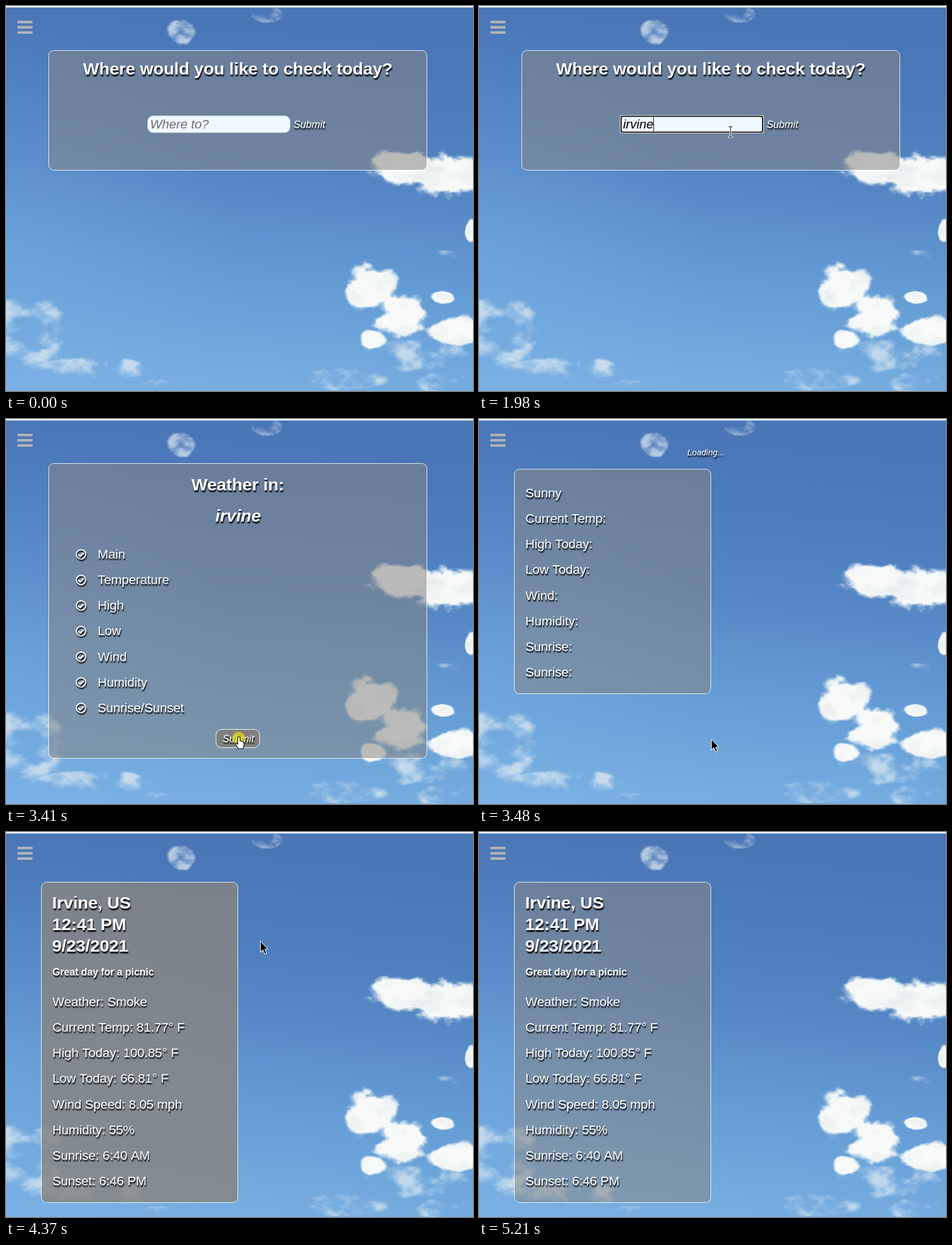
Write an HTML page with a canvas that moves like this. It is 825 px wide and 679 px high and loops after 5740 ms.

```html
<!DOCTYPE html>
<html lang="en">
<head>
<meta charset="utf-8">
<title>Weather check</title>
<style>
  html, body { margin: 0; width: 100%; height: 100%; overflow: hidden; background: #fff; }
  canvas { display: block; }
</style>
</head>
<body>
<canvas id="stage" width="825" height="679"></canvas>
<script>
const W = 825, H = 679, LOOP = 5740, STEP = 70;
const ctx = document.getElementById('stage').getContext('2d');
const FAMILY = '"Liberation Sans", Arial, sans-serif';
const TITLE = 'bold 30.2px', ROW = 45.15;

const clamp = v => Math.max(0, Math.min(1, v));
const mix = (a, b, p) => a + (b - a) * p;
const smooth = p => p * p * (3 - 2 * p);

// ---------- sky ----------
// Soft ellipses [x, y, rx, ry]; noise frays their edges.
const CLOUDS = [
  [695,284,72,34], [788,302,68,48], [645,500,54,50], [695,540,62,46],
  [795,572,58,28], [648,588,28,19], [770,514,24,13], [822,398,12,24]
];
const WISPS = [
  [35,570,70,75], [155,640,130,22], [265,672,45,15], [720,615,110,30],
  [595,658,85,22], [775,664,55,22], [775,445,40,16], [460,14,32,16], [310,45,26,24]
];

function hash(x, y) {
  const v = Math.sin(x * 127.1 + y * 311.7) * 43758.5453;
  return v - Math.floor(v);
}

function noise(x, y) {
  const ix = Math.floor(x), iy = Math.floor(y);
  const px = smooth(x - ix), py = smooth(y - iy);
  return mix(mix(hash(ix, iy), hash(ix + 1, iy), px),
    mix(hash(ix, iy + 1), hash(ix + 1, iy + 1), px), py);
}

// Layered noise, about -1 to 1
function ragged(x, y) {
  let sum = 0;
  for (let octave = 0, gain = 1; octave < 5; octave++, gain *= 0.55) {
    const scale = 2 ** octave;
    sum += (noise(x * scale / 44, y * scale / 30) - 0.5) * gain;
  }
  return sum;
}

function cover(shapes, x, y) {
  let best = -1;
  for (const [cx, cy, rx, ry] of shapes) {
    best = Math.max(best, 1 - ((x - cx) / rx) ** 2 - ((y - cy) / ry) ** 2);
  }
  return best;
}

function newLayer() {
  const layer = document.createElement('canvas');
  layer.width = W;
  layer.height = H;
  return layer;
}

function paintClouds() {
  const layer = newLayer(), g = layer.getContext('2d');
  const image = g.createImageData(W, H);
  for (let y = 0; y < H; y++) {
    for (let x = 0; x < W; x++) {
      const solid = cover(CLOUDS, x, y), thin = cover(WISPS, x, y);
      if (Math.max(solid, thin) < -0.5) continue;
      const n = ragged(x, y);
      const dense = smooth(clamp((solid + n * 0.75 - 0.1) / 0.42));
      const faint = 0.75 * smooth(clamp((Math.min(thin, 0.35) + n * 0.8 - 0.2) / 0.6));
      const alpha = Math.max(dense, faint);
      const shade = 14 * clamp(n * 2);
      const i = (y * W + x) * 4;
      image.data[i] = mix(214, 251, alpha) - shade;
      image.data[i + 1] = mix(232, 252, alpha) - shade * 0.8;
      image.data[i + 2] = mix(246, 249, alpha) - shade * 0.6;
      image.data[i + 3] = alpha * 248;
    }
  }
  g.putImageData(image, 0, 0);
  return layer;
}

function paintSky() {
  const layer = newLayer(), g = layer.getContext('2d');
  const base = g.createLinearGradient(30, 0, -30, H);
  ['#4a76b6', '#4c7dbd', '#5487c4', '#6198d2', '#6da6db', '#7cb2e4'].forEach((color, i, all) =>
    base.addColorStop(i / (all.length - 1), color));
  g.fillStyle = base;
  g.fillRect(0, 0, W, H);
  const glow = g.createRadialGradient(0, 430, 0, 0, 430, 400);
  glow.addColorStop(0, 'rgba(125,180,235,.3)');
  glow.addColorStop(1, 'rgba(125,180,235,0)');
  g.fillStyle = glow;
  g.fillRect(0, 0, W, H);
  g.drawImage(paintClouds(), 0, 0);
  g.fillStyle = '#fff';
  g.fillRect(0, 0, W, 2);
  g.fillStyle = 'rgba(255,255,255,.5)';
  g.fillRect(0, 2, W, 1);
  return layer;
}
const sky = paintSky();

// ---------- drawing helpers ----------
function shadow(on) {
  ctx.shadowColor = on ? '#000' : 'transparent';
  ctx.shadowOffsetX = on ? 1 : 0;
  ctx.shadowOffsetY = on ? 2.5 : 0;
  ctx.shadowBlur = on ? 2 : 0;
}

function label(text, x, y, style, { align = 'left', color = '#fff', shade = true } = {}) {
  shadow(shade);
  ctx.font = `${style} ${FAMILY}`;
  ctx.textAlign = align;
  ctx.fillStyle = color;
  ctx.fillText(text, x, Math.round(y));
  shadow(false);
}

function box(x, y, w, h, r, fill, stroke) {
  ctx.beginPath();
  ctx.roundRect(x, y, w, h, r);
  ctx.fillStyle = fill;
  ctx.fill();
  if (!stroke) return;
  ctx.strokeStyle = stroke;
  ctx.lineWidth = 1;
  ctx.stroke();
}

function panel(x, y, right, bottom, hover = 0) {
  box(x + 0.5, y + 0.5, right - x - 1, bottom - y - 1, 9,
    `rgba(134,133,130,${mix(0.53, 0.83, hover)})`, 'rgba(255,255,255,.9)');
}

function rows(lines, x, y) {
  lines.forEach((line, i) => label(line, x, y + i * ROW, '22.5px'));
}

function checkMark(x, y) {
  shadow(true);
  ctx.strokeStyle = '#fff';
  ctx.lineWidth = 2;
  ctx.beginPath();
  ctx.arc(x, y, 8.3, 0, Math.PI * 2);
  ctx.stroke();
  ctx.lineWidth = 2.8;
  ctx.beginPath();
  ctx.moveTo(x - 4.5, y + 0.2);
  ctx.lineTo(x - 1.2, y + 3.3);
  ctx.lineTo(x + 4.6, y - 2.6);
  ctx.stroke();
  shadow(false);
}

function menuIcon() {
  for (let i = 0; i < 3; i++) box(20, 26 + i * 9.3, 27, 4.4, 1.2, '#b1b4b5');
}

// ---------- screens ----------
function searchScreen(typed, focused, caret) {
  panel(75, 78, 744, 290);
  label('Where would you like to check today?', 409.5, 121, TITLE, { align: 'center' });
  if (focused) {
    box(249, 192.5, 254, 32, 4, '#fff');
    box(250, 193.5, 252, 30, 3.5, '#101010');
    box(252, 195.5, 248, 26, 2, '#f0f8ff');
  } else {
    box(250, 193.5, 252, 30, 10, '#f0f8ff');
  }
  const color = typed ? '#000' : '#6c6c74';
  label(typed || 'Where to?', 254.5, 216, 'italic 22.5px', { color, shade: false });
  if (caret) {
    ctx.fillStyle = '#000';
    ctx.fillRect(254 + Math.round(ctx.measureText(typed).width), 196, 1, 25);
  }
  label('Submit', 508, 215, 'italic 18px');
}

const OPTIONS = ['Main', 'Temperature', 'High', 'Low', 'Wind', 'Humidity', 'Sunrise/Sunset'];

function optionsScreen(hover) {
  panel(75, 78, 744, 599);
  label('Weather in:', 409.5, 126, TITLE, { align: 'center' });
  label('irvine', 410, 181, `italic ${TITLE}`, { align: 'center' });
  rows(OPTIONS, 162, 246);
  OPTIONS.forEach((_, i) => checkMark(132.5, 238.7 + i * ROW));
  const drop = hover ? 1 : 0;
  box(371, 546.5 + drop, 77, 32, 10, `rgba(128,126,122,${hover ? 0.9 : 0.55})`, '#fff');
  label('Submit', 409.5 + drop, 569 + drop, hover ? 'italic 18px' : '18px', { align: 'center' });
}

function loadingText() {
  label('Loading...', 368, 64, 'italic 15px');
}

function emptyResult() {
  panel(62, 88, 410, 485);
  rows(['Sunny', 'Current Temp:', 'High Today:', 'Low Today:', 'Wind:', 'Humidity:',
    'Sunrise:', 'Sunrise:'], 82, 138);
}

function resultScreen(hover) {
  panel(62, 88, 410, 654, hover);
  ['Irvine, US', '12:41 PM', '9/23/2021'].forEach((line, i) =>
    label(line, 81.5, 135 + i * 38, TITLE));
  label('Great day for a picnic', 82, 253, 'bold 17.55px');
  rows(['Weather: Smoke', 'Current Temp: 81.77° F', 'High Today: 100.85° F', 'Low Today: 66.81° F',
    'Wind Speed: 8.05 mph', 'Humidity: 55%', 'Sunrise: 6:40 AM', 'Sunset: 6:46 PM'], 82, 307);
}

// ---------- pointers ----------
const ARROW = new Path2D('M0 0V19.5L4.5 15.3L7.7 22.8L10.8 21.4L7.6 14.2L13 14Z');
const HAND = new Path2D('M-2-2Q0-4 2-2V4L8 6L9 12L7 18H-1L-6 10L-5 8L-2 10Z');

function pointer(shape, x, y, fill, edge) {
  ctx.save();
  ctx.translate(x + 0.5, y + 0.5);
  ctx.fillStyle = fill;
  ctx.fill(shape);
  ctx.strokeStyle = edge;
  ctx.lineWidth = 1.1;
  ctx.lineJoin = 'round';
  ctx.stroke(shape);
  ctx.restore();
}
const arrow = (x, y) => pointer(ARROW, x, y, '#000', '#fff');
const hand = (x, y) => pointer(HAND, x, y, '#fff', '#000');

function beam(x, y) {
  for (const [color, grow] of [['#fff', 1], ['#000', 0]]) {
    const bar = (left, top, w, h) =>
      ctx.fillRect(x + left - grow, y + top - grow, w + grow * 2, h + grow * 2);
    ctx.fillStyle = color;
    bar(-0.5, -9, 1, 19);
    bar(-3.5, -9, 7, 1);
    bar(-3.5, 9, 7, 1);
  }
}

function clickDot(x, y) {
  ctx.fillStyle = 'rgba(222,218,20,.75)';
  ctx.beginPath();
  ctx.arc(x, y, 11.2, 0, Math.PI * 2);
  ctx.fill();
}

// ---------- motion ----------
const KEYSTROKES = [1370, 1500, 1700, 1770, 1900, 1970];
// Key points of the pointer over the result: time, x, y
const WANDER = [[3480, 410, 564], [3880, 511, 332], [4160, 275, 240], [4370, 449, 192],
  [4440, 465, 237], [4730, 250, 83], [5000, 414, 567], [5140, 757, 631], [5210, 900, 660]];

// The pointer is only redrawn every STEP ms.
const snap = (t, origin) => origin + Math.floor((t - origin) / STEP) * STEP;

function approach(t) {
  if (t < 70) return;
  if (t < 630) {
    const p = Math.sin((snap(t, 70) - 70) / 560 * Math.PI / 2);
    arrow(mix(792, 444, p), mix(644, 221, p));
    return;
  }
  if (t < 690) clickDot(444.5, 221.5);
  beam(444.5, 221.5);
}

function toButton(t) {
  const p = clamp((snap(t, 2640) - 2570) / 490);
  const bend = (a, b, c) => mix(mix(a, b, p), mix(b, c, p), p);
  return [bend(444, 235, 411), bend(220, 430, 563)];
}

function wander(t) {
  const now = snap(t, 3460);
  const next = WANDER.findIndex(key => key[0] > now);
  if (next < 0) return [W + 50, H];
  if (next === 0) return WANDER[0].slice(1);
  const [t0, x0, y0] = WANDER[next - 1], [t1, x1, y1] = WANDER[next];
  const p = (now - t0) / (t1 - t0);
  return [mix(x0, x1, p), mix(y0, y1, p)];
}

// The panel colour follows how long the pointer has lately been inside.
function hoverLevel(t) {
  let inside = 0;
  for (let i = 0; i < 4; i++) {
    const [x, y] = wander(t - i * STEP);
    if (x > 62 && x < 409 && y > 88 && y < 654) inside++;
  }
  return Math.min(1, inside / 3);
}

function draw(t) {
  ctx.drawImage(sky, 0, 0);
  menuIcon();
  if (t < 2040) {
    const typed = 'irvine'.slice(0, KEYSTROKES.filter(time => time <= t).length);
    const focused = t >= 630;
    searchScreen(typed, focused, focused && (t < 1170 || typed));
    approach(t);
  } else if (t < 3480) {
    const [x, y] = toButton(t);
    const hover = t >= 3050;
    optionsScreen(hover);
    if (t < 2110) loadingText();
    if (t >= 3270) clickDot(x, y);
    (hover ? hand : arrow)(x, y);
  } else {
    if (t < 3610) {
      loadingText();
      emptyResult();
    } else {
      resultScreen(hoverLevel(t));
    }
    arrow(...wander(t));
  }
}

const start = performance.now();
function tick() {
  draw((performance.now() - start) % LOOP);
  requestAnimationFrame(tick);
}
tick();
</script>
</body>
</html>
```
